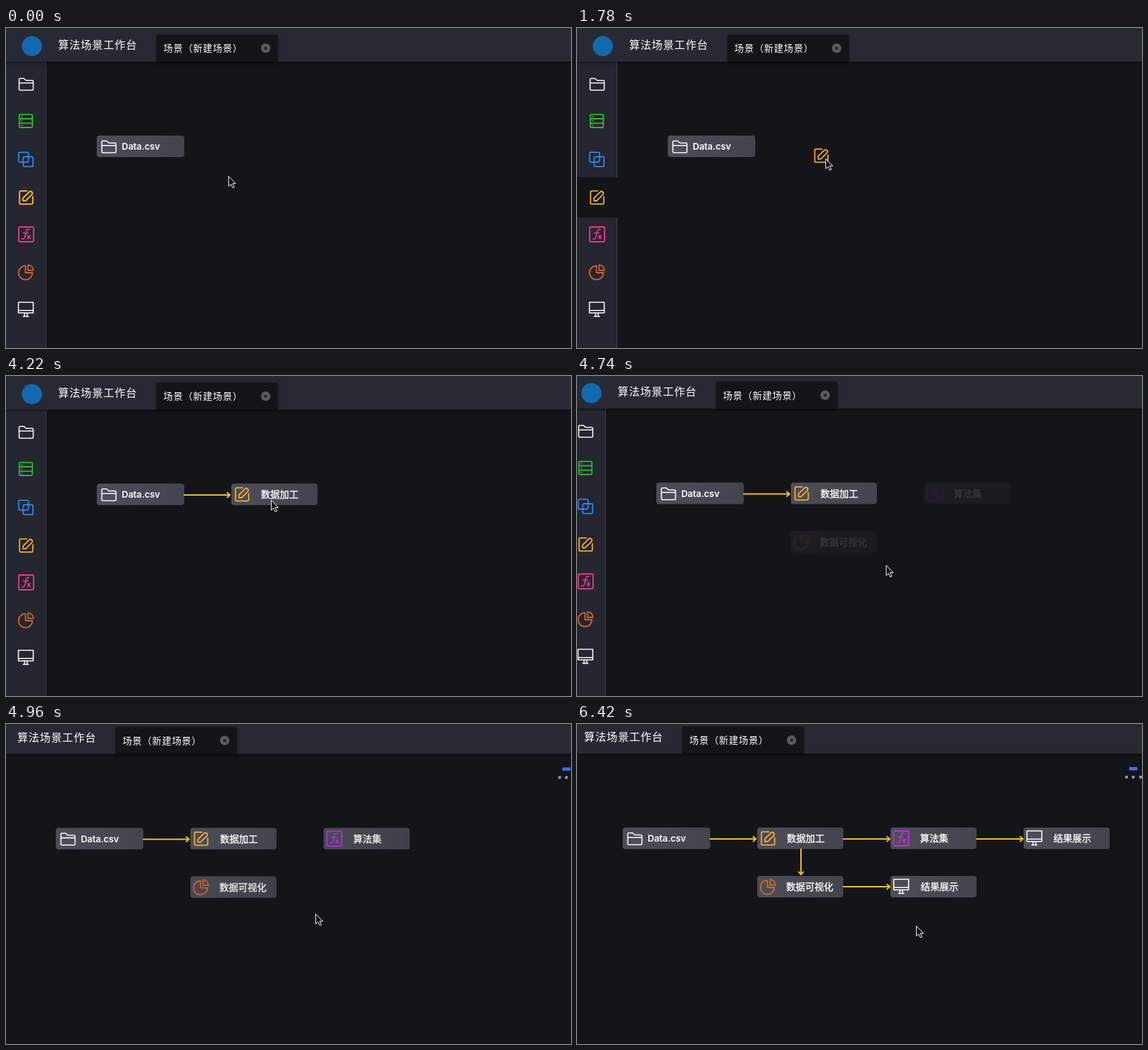
An HTML page for the animation above (6.76 s loop, 840 px wide and 476 px high).

```html
<!DOCTYPE html>
<html lang="zh-CN">
<head>
<meta charset="utf-8">
<title>算法场景工作台</title>
<style>
html, body { margin: 0; width: 100%; height: 100%; overflow: hidden; background: #141519; }
svg { display: block; }
text { fill: #fff; font: 14px "Noto Sans CJK SC", "Noto Sans CJK", sans-serif; }
.label { font-weight: 500; stroke: #fff; stroke-width: .35px; }
.latin { font: 600 13.5px Inter, sans-serif; letter-spacing: -.1px; }
.icon { fill: none; stroke-width: 1.8; stroke-linejoin: round; stroke-linecap: round; }
.link { fill: none; stroke: #fcc116; stroke-width: 2; stroke-linecap: round; stroke-linejoin: round; }
</style>
</head>
<body>
<svg width="840" height="476" viewBox="0 0 840 476">
  <defs>
    <linearGradient id="card"><stop stop-color="#4c4e58"/><stop offset="1" stop-color="#42444e"/></linearGradient>
    <filter id="shade" x="-10%" y="-30%" width="120%" height="160%" color-interpolation-filters="sRGB">
      <feDropShadow dx="0" dy="1" stdDeviation="2" flood-opacity=".55"/>
    </filter>
    <g id="folder" class="icon" stroke="#fff">
      <path d="M-10.5 7v-14.500q0-1.500 1.500-1.500h5.500l3.500 3h9q1.500 0 1.500 1.500V7q0 1.500-1.500 1.500h-18q-1.500 0-1.500-1.500ZM-10.5-2.200h21" style="stroke-width:1.6"/>
    </g>
    <g id="server" class="icon" stroke="#2bc02b">
      <rect x="-9.700" y="-9.700" width="19.400" height="19.400" rx="1.500"/>
      <path d="M-9.700-3.300h19.400M-9.700 3.300h19.400M-6-6.500h.5M-6 0h.5M-6 6.500h.5"/>
    </g>
    <g id="copy" class="icon" stroke="#2f88f2">
      <rect x="-10.700" y="-10.700" width="14.700" height="14.700" rx="2"/>
      <rect x="-4" y="-4" width="14.700" height="14.700" rx="2"/>
    </g>
    <g id="edit" class="icon" stroke="#fbb02d">
      <path d="M1-9.700H-8q-1.800 0-1.800 1.800V8q0 1.800 1.800 1.800H8q1.800 0 1.800-1.800V-1"/>
      <path d="M-4.700 5V1L4.500-8.200q2-1.600 3.800.2t.2 3.800L-.7 5Z"/>
    </g>
    <g id="fx" class="icon">
      <rect x="-11" y="-11" width="22" height="22" rx="1.500"/>
      <path d="M4.500-7Q1-9 0-4.500L-2 4Q-3 8-6.500 6.500M-4.500-2H3M2 1.500L6 6.500M6 1.500L2 6.500" style="stroke-width:1.6"/>
    </g>
    <g id="pie" class="icon" stroke="#d8652e">
      <path d="M-1-9.300A10.300 10.300 0 1 0 9.300 1H-1Z"/>
      <path d="M2.700-10.600V-2.500H10.800A8.100 8.100 0 0 0 2.700-10.600Z"/>
    </g>
    <g id="monitor" class="icon" stroke="#fff">
      <path d="M-11-11H11V4.700H-11ZM-11 1.300H11M-2 5V10M2 5V10M-4 10H4" style="stroke-width:1.6"/>
    </g>
  </defs>
  <g id="app">
    <rect y="50" width="60" height="450" fill="#242630"/>
    <path d="M59.500 50V500" stroke="#3c3f47"/>
    <rect id="hover" y="222" width="60" height="60" fill="#141519"/>
    <rect x="-20" y="-20" width="960" height="70" fill="#282a33" filter="url(#shade)"/>
    <circle cx="38.500" cy="27" r="15" fill="#1269ae"/>
    <text x="77.500" y="31" style="font-size:16px;letter-spacing:.8px">算法场景工作台</text>
    <rect x="224" y="10" width="180" height="40" fill="#141519" filter="url(#shade)"/>
    <text x="234" y="35.200" style="letter-spacing:.7px">场景（新建场景）</text>
    <circle cx="386" cy="30" r="7" fill="#5c5c5e"/>
    <path d="M384 28l4 4m0-4l-4 4" stroke="#17181c" stroke-width="1.500"/>
    <use href="#folder" x="30" y="84"/>
    <use href="#server" x="29.500" y="138.300"/>
    <use href="#copy" x="29.500" y="195.500"/>
    <use href="#edit" x="30" y="252"/>
    <use href="#fx" x="30" y="307" stroke="#f23c8c"/>
    <use href="#pie" x="30" y="363"/>
    <use href="#monitor" x="29.500" y="419"/>
    <path d="M888 70h12v5h-12Z" fill="#4468f2"/>
    <path d="M882 83h4v4h-4ZM892 83h4v4h-4ZM903 83h4v4h-4Z" fill="#8f96b3"/>
    <g id="graph"></g>
    <use id="dragged" href="#edit"/>
  </g>
  <path id="cursor" d="M.5.500V15.500L4 12.300L6.500 17.800L9 16.700L6.500 11.300H11Z" fill="#111" stroke="#fff" stroke-linejoin="round"/>
</svg>
<script>
const LOOP = 6760;
const $ = id => document.getElementById(id);
const graph = $('graph');

const linear = p => p;
const outQuart = p => 1 - (1 - p) ** 4;
const outCubic = p => 1 - (1 - p) ** 3;
const inOut = n => p => p < .5 ? (2 * p) ** n / 2 : 1 - (2 - 2 * p) ** n / 2;
const span = (t, from, to, ease = linear) =>
  ease(Math.min(1, Math.max(0, (t - from) / (to - from))));
const place = (el, x, y) => el.setAttribute('transform', `translate(${x} ${y})`);

function add(markup) {
  graph.insertAdjacentHTML('beforeend', markup);
  return graph.lastElementChild;
}

function node(x, y, label, icon, textX = 44, from = -2, to = -1, width = 128) {
  const isFile = icon === 'folder';
  const el = add(`<g transform="translate(${x} ${y})">
    <rect width="${width}" height="32" rx="4" fill="url(#card)"/>
    ${icon ? `<use href="#${icon}" x="${isFile ? 18 : 16}" y="${isFile ? 17 : 16}" stroke="#c22df0"/>` : ''}
    <text class="${isFile ? 'latin' : 'label'}" x="${textX}" y="21.200">${label}</text></g>`);
  return { el, from, to };
}

function link(x, y, length, from, to, turn = 0) {
  const el = add(`<path class="link" transform="translate(${x} ${y}) rotate(${turn})"/>`);
  return { el, length, from, to };
}

const nodes = [
  node(135, 160, 'Data.csv', 'folder', 37, -2, -1, 130),
  node(335, 160, '数据加工', '', 44, 1920, 2480),
  node(533, 160, '算法集', 'fx', 44, 4700, 4980),
  node(335, 232, '数据可视化', 'pie', 43, 4700, 4980),
  node(731, 160, '结果展示', 'monitor', 44.5, 5860, 6140),
  node(533, 232, '结果展示', 'monitor', 45, 5860, 6140)
];
const links = [
  link(265, 177, 68, 3240, 3560),
  link(463, 177, 69, 4980, 5280),
  link(400, 192, 38, 4980, 5280, 90),
  link(661, 177, 69, 6120, 6420),
  link(463, 248, 69, 6120, 6420)
];

// Each move: start, end, destination x, y, easing
const cursorMoves = [
  [240, 900, 45, 256, inOut(2)],
  [920, 1020, 34, 256, linear],
  [1240, 1920, 374, 193, inOut(4)],
  [1920, 2580, 393, 183, inOut(2)],
  [4200, 4460, 459, 281, inOut(2)],
  [4700, 5280, 460, 282, outQuart],
  [5400, 5540, 504, 300, inOut(2)]
];
const iconMoves = [
  [1240, 1920, 368, 189, inOut(4)],
  [1920, 2580, 351, 176, outCubic]
];

function follow(t, moves, x, y) {
  for (const [from, to, x1, y1, ease] of moves) {
    const p = span(t, from, to, ease);
    x += (x1 - x) * p;
    y += (y1 - y) * p;
  }
  return [x, y];
}

function draw(t) {
  const pan = span(t, 4700, 5280, outQuart);
  place($('app'), -67 * pan, -6 * pan);
  place($('cursor'), ...follow(t, cursorMoves, 330.5, 220));
  place($('dragged'), ...follow(t, iconMoves, 30, 252));
  $('hover').setAttribute('opacity', span(t, 560, 1020) - span(t, 1940, 2580));
  for (const { el, from, to } of nodes) el.setAttribute('opacity', span(t, from, to));
  for (const { el, length, from, to } of links) {
    const p = span(t, from, to, outCubic);
    el.setAttribute('d', p ? `M0 0h${length * p}m-4-3.500l4 3.500l-4 3.500` : '');
  }
}

const start = performance.now();
function tick() {
  draw((performance.now() - start) % LOOP);
  requestAnimationFrame(tick);
}
tick();
</script>
</body>
</html>
```
